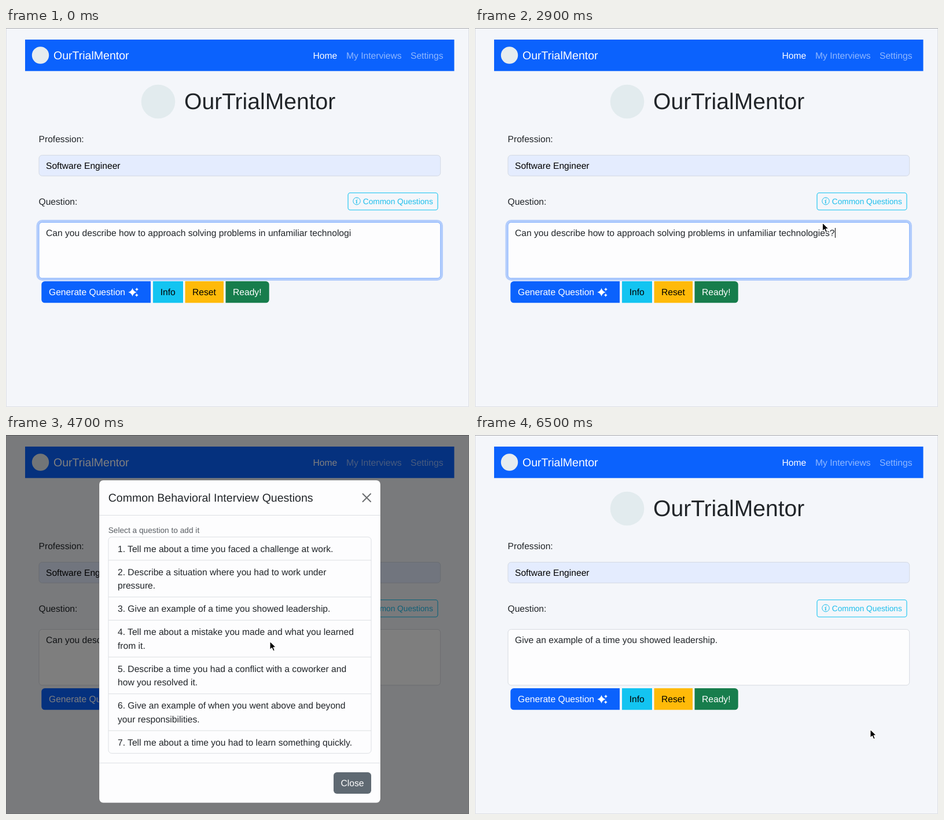
An HTML page that plays this animation: 800 by 654 pixels, repeating every 6.6 s.

```html
<!DOCTYPE html>
<html lang="en">
<head>
<meta charset="utf-8">
<title>Interview practice</title>
<style>
  html, body { margin: 0; width: 100%; height: 100%; overflow: hidden; background: #f4f6fa; }
  svg { display: block; width: 100vw; height: 100vh; }
  text { font: 15.64px "Liberation Sans", Arial, sans-serif; fill: #212529; white-space: pre; text-rendering: geometricPrecision; }
  .big { font-size: 39.1px; }
  .mid { font-size: 19.55px; }
  .small { font-size: 13.69px; }
  .white { fill: #fff; }
  .faint { fill: #fff; fill-opacity: .55; }
  .black { fill: #000; }
  .line { fill: none; stroke: #dcdfe3; }
</style>
</head>
<body>
<svg viewBox="0 0 800 654">
  <rect width="800" height="654" fill="#f4f6fa"/>
  <path d="M.5 0V653.5H799.5V0" fill="none" stroke="#dddfe4"/>
  <path d="M0 .5H800" stroke="#a9aaad"/>

  <rect x="33" y="20" width="741.5" height="54.3" fill="#0b62fd"/>
  <circle cx="59.5" cy="47" r="14.7" fill="#e6ecef"/>
  <text class="mid white" x="82" y="54">OurTrialMentor</text>
  <text class="white" x="530.5" y="52.5">Home</text>
  <text class="faint" x="588" y="52.5">My Interviews</text>
  <text class="faint" x="699" y="52.5">Settings</text>

  <circle cx="263" cy="127" r="29.3" fill="#e2ebee"/>
  <text class="big" x="308" y="140">OurTrialMentor</text>

  <text x="56.5" y="196.5">Profession:</text>
  <rect x="57" y="219.5" width="693.7" height="35.7" rx="5.5" fill="#e4ecfe" stroke="#d3d9e3"/>
  <text class="black" x="69" y="242.5">Software Engineer</text>

  <text x="56.5" y="304.5">Question:</text>
  <g id="common">
    <rect id="commonFill" x="591" y="284.5" width="155" height="29.5" rx="3.8" fill="#14c3f1" stroke="#14c3f1" stroke-width="1.1"/>
    <circle cx="606" cy="298.7" r="6.2" fill="none" stroke="currentColor"/>
    <path d="M606.8 295.2v.1M604.7 297.8h1.6l-1 4h1.4" fill="none" stroke="currentColor" stroke-width="1.2" stroke-linecap="round"/>
    <text class="small" x="616.8" y="303.7" style="fill: currentColor">Common Questions</text>
  </g>

  <rect id="ring" x="56.5" y="335" width="694.5" height="97" rx="6" fill="none" stroke="#0b62fd"/>
  <rect id="area" x="57" y="335.4" width="693.7" height="96.4" rx="5.5" fill="#fdfdfe"/>
  <text id="answer" x="69" y="359"></text>
  <rect id="caret" y="345" width="1" height="17"/>

  <path d="M250 437V474.3H67a5.7 5.7 0 0 1-5.7-5.7V442.7a5.7 5.7 0 0 1 5.7-5.7Z" fill="#0b62fd"/>
  <rect x="254" y="437" width="52" height="37.3" fill="#13c4f1"/>
  <rect x="309.5" y="437" width="66.5" height="37.3" fill="#ffba09"/>
  <path d="M379.5 437H449a5.7 5.7 0 0 1 5.7 5.7V468.6a5.7 5.7 0 0 1-5.7 5.7H379.5Z" fill="#177d4c"/>
  <text class="white" x="74" y="461">Generate Question</text>
  <text class="black" x="266.7" y="461">Info</text>
  <text class="black" x="322" y="461">Reset</text>
  <text class="white" x="392" y="461">Ready!</text>
  <g id="sparkles" fill="#fff"></g>

  <rect id="dim" width="800" height="654"/>

  <g id="modal">
    <rect x="161" y="78" width="486" height="556.7" rx="7" fill="#fdfdfe" stroke="#000" stroke-opacity=".15"/>
    <path class="line" d="M161 138.5H647M161 566H647"/>
    <text class="mid" x="176.7" y="114.7">Common Behavioral Interview Questions</text>
    <path d="M616.5 101.5l13.5 13.5m0-13.5l-13.5 13.5" stroke="#6b6d70" stroke-width="2" stroke-linecap="round"/>
    <text class="small" x="176.7" y="169.3" style="fill: #5a5f64">Select a question to add it</text>
    <rect class="line" x="177" y="176" width="454" height="373.3" rx="5.7"/>
    <g id="list"></g>
    <rect x="566" y="582" width="65" height="37" rx="5.7" fill="#5f6972"/>
    <text class="white" x="578.5" y="606">Close</text>
  </g>

  <g id="pointer" stroke-linejoin="round">
    <path id="arrow" d="M0 0V14.5L3.4 11.4 5.8 16.8 8.3 15.7 6 10.4H10.5Z" fill="#000" stroke="#fff" stroke-width="1.1"/>
    <path id="hand" d="M.2 11V1.2Q.2-.5 1.5-.5T2.9 1.2V6Q5.3 4.6 5.6 6.6 7.7 5.6 8 7.4 9.9 6.8 9.9 9V12.5Q9.8 15 8.3 16.5V18H.9V16.5Q-1.2 14.3-3.8 10.6-4.4 8.8-2.6 9-1.4 9.3.2 11Z" fill="#fff" stroke="#000" stroke-width="1.1"/>
    <path id="beam" d="M-3-7Q0-7 0-5Q0-7 3-7M0-5V5M-3 7Q0 7 0 5Q0 7 3 7M-1.5 2H1.5" fill="none" stroke="#222" stroke-width="1.2"/>
  </g>
</svg>
<script>
(() => {
const LOOP = 6600, STEP = 100;
const el = Object.fromEntries([...document.querySelectorAll('[id]')].map(e => [e.id, e]));
const set = (e, attrs) => { for (const k in attrs) e.setAttribute(k, attrs[k]); };
const ramp = (t, a, b) => Math.min(1, Math.max(0, (t - a) / (b - a)));
const mix = (a, b, u) => a + (b - a) * u;
const mixColor = (a, b, u) => `rgb(${a.map((v, i) => Math.round(mix(v, b[i], u)))})`;
const smooth = u => u * u * (3 - 2 * u);

// CSS ease-out: cubic-bezier(0, 0, .58, 1)
function easeOut(x) {
  let lo = 0, hi = 1;
  for (let i = 0; i < 20; i++) {
    const s = (lo + hi) / 2;
    if (1.74 * (1 - s) * s * s + s ** 3 < x) lo = s; else hi = s;
  }
  return smooth(lo);
}

const questions = [
  'Tell me about a time you faced a challenge at work.',
  'Describe a situation where you had to work under|pressure.',
  'Give an example of a time you showed leadership.',
  'Tell me about a mistake you made and what you learned|from it.',
  'Describe a time you had a conflict with a coworker and|how you resolved it.',
  'Give an example of when you went above and beyond|your responsibilities.',
  'Tell me about a time you had to learn something quickly.'
];
const lineHeight = 23.46;
let rowTop = 176, rows = '';
questions.forEach((q, i) => {
  const lines = `${i + 1}. ${q}`.split('|');
  if (i) rows += `<path class="line" d="M177 ${rowTop}H631"/>`;
  lines.forEach((s, j) => rows += `<text x="193" y="${rowTop + 25.5 + j * lineHeight}">${s}</text>`);
  rowTop += 16.6 + lines.length * lineHeight;
});
el.list.innerHTML = rows;

const star = (x, y, r) =>
  `<path d="M${x} ${y - r}Q${x + r * .2} ${y - r * .2} ${x + r} ${y}Q${x + r * .2} ${y + r * .2} ${x} ${y + r}` +
  `Q${x - r * .2} ${y + r * .2} ${x - r} ${y}Q${x - r * .2} ${y - r * .2} ${x} ${y - r}Z"/>`;
el.sparkles.innerHTML = star(218.5, 456, 7.3) + star(226, 451, 3) + star(225.8, 461, 3);

const typed = 'Can you describe how to approach solving problems in unfamiliar technologies?';
const missing = t => t < 200 ? 3 : t < 400 ? 2 : t < 800 ? 1 : 0;
const caretOn = t => [[200, 1300], [1800, 2500], [2800, 3300]].some(([a, b]) => t >= a && t < b);

// time, x, y
const track = [
  [2500, 470, 390], [3200, 685, 301], [4100, 685, 301], [4700, 456, 356],
  [4800, 454, 354], [5400, 403, 303], [6200, 403, 303], [6500, 683, 508]
];
function pointerAt(t) {
  const i = track.findIndex(p => p[0] > t);
  if (i < 0) return track[track.length - 1].slice(1);
  const a = track[Math.max(0, i - 1)], b = track[i];
  const u = smooth(ramp(t, a[0], b[0]));
  return [mix(a[1], b[1], u), mix(a[2], b[2], u)];
}
const pointerKind = t =>
  t >= 3100 && t < 3900 ? 'hand' :
  t < 2900 || (t >= 5200 && t < 6000) ? 'beam' : 'arrow';

function draw(t) {
  el.answer.textContent = t < 5700 ? typed.slice(0, typed.length - missing(t)) : questions[2];
  set(el.caret, { x: 69.5 + el.answer.getComputedTextLength(), opacity: +caretOn(t) });

  const focus = 1 - ramp(t, 3720, 3870);
  set(el.ring, { 'stroke-width': 8 * focus, 'stroke-opacity': .28 * focus });
  set(el.area, { stroke: mixColor([215, 219, 225], [134, 178, 254], focus) });

  const hover = ramp(t, 3020, 3170) - ramp(t, 3850, 4000);
  set(el.commonFill, { 'fill-opacity': hover });
  el.common.style.color = mixColor([28, 190, 236], [0, 0, 0], hover);

  set(el.dim, { opacity: .5 * (ramp(t, 3850, 4000) - ramp(t, 5930, 6080)) });
  const shown = ramp(t, 4000, 4150) - ramp(t, 5762, 5912);
  const lift = t < 5000 ? 1 - easeOut(ramp(t, 4000, 4300)) : easeOut(ramp(t, 5762, 6062));
  set(el.modal, { opacity: shown, transform: `translate(0 ${-48.9 * lift})` });

  const [x, y] = pointerAt(t), kind = pointerKind(t);
  set(el.pointer, { transform: `translate(${x} ${y})`, opacity: +(t >= 2500) });
  for (const k of ['arrow', 'hand', 'beam']) el[k].style.display = k === kind ? '' : 'none';
}

const start = performance.now();
function tick() {
  const t = (performance.now() - start) % LOOP;
  draw(Math.floor(t / STEP) * STEP);
  requestAnimationFrame(tick);
}
tick();
})();
</script>
</body>
</html>
```
